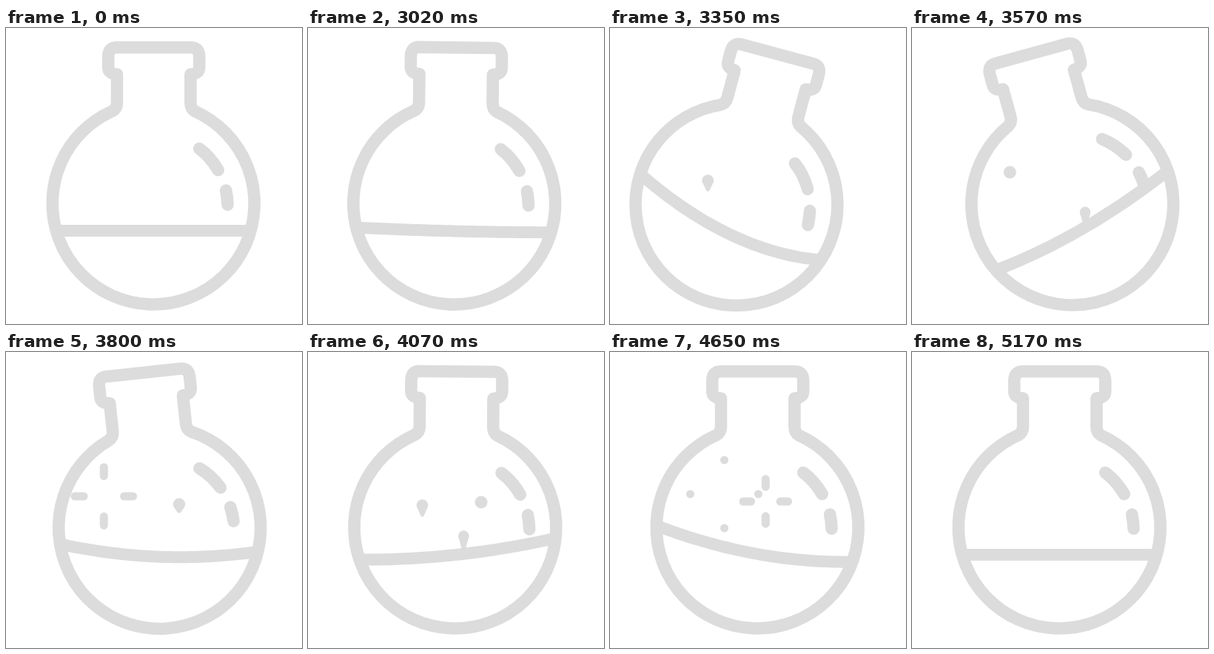
Recreate the animation shown at these times as an HTML page with a canvas. Size 400 px wide and 400 px high, loop 5.22 s.

```html
<!DOCTYPE html>
<html lang="en">
<head>
<meta charset="utf-8">
<title>Flask</title>
<style>
html, body { margin: 0; width: 100%; height: 100%; overflow: hidden; background: #fff; }
canvas { display: block; width: 100vw; height: 100vh; }
</style>
</head>
<body>
<canvas id="stage" width="400" height="400"></canvas>
<script>
const ctx = document.getElementById('stage').getContext('2d');
const LOOP = 5220, STEP = 25, START = 3000;
const COLOR = '#dcdcdc';
const R = 136.5, LINE = 16.6, CX = 199.2, CY = 237;

// Keys: time, then one or more values
const TILT = [[2985, 0], [3305, 17], [3585, -15.5], [3980, 1], [4160, 0]];
const SHIFT = [[2985, 0], [3285, -34], [3585, 17.7], [4010, -0.5], [4160, 0]];
// Liquid surface: height, slope, bend
const SLOSH = [
  [2970, 0, 0, 0], [3340, 7.5, 62, -30], [3580, 4, -76, -16], [3860, 2, 15, -12],
  [4110, 0, -16, -8], [4650, -1, 24.5, -14], [4920, 0, -5, -2], [5150, 0, 0, 0]
];
const DROPS = [
  { x: 132.3, top: 195, start: 3125 },
  { x: 234, top: 203, start: 3510 },
  { x: 154.5, top: 192, start: 3870 },
  { x: 210.3, top: 202, start: 4010 }
];
const RISE = 364, POP = 580, BURST = 200, FADE = 225, REACH = 46;

const mix = (a, b, p) => a + (b - a) * p;

function sample(keys, t) {
  if (t <= keys[0][0]) return keys[0].slice(1);
  for (let i = 1; i < keys.length; i++) {
    const a = keys[i - 1], b = keys[i];
    if (t < b[0]) {
      const p = (1 - Math.cos(Math.PI * (t - a[0]) / (b[0] - a[0]))) / 2;
      return a.slice(1).map((v, k) => mix(v, b[k + 1], p));
    }
  }
  return keys[keys.length - 1].slice(1);
}

function stroke(width, draw) {
  ctx.lineWidth = width;
  ctx.beginPath();
  draw();
  ctx.stroke();
}

// Coordinates relative to the centre of the bulb
function drawFlask(cx, cy, tilt) {
  ctx.save();
  ctx.translate(cx, cy);
  ctx.rotate(tilt * Math.PI / 180);
  const mouth = Math.atan2(-124.5, 56);
  stroke(LINE, () => {
    ctx.arc(0, 0, R, mouth, Math.PI - mouth);
    ctx.quadraticCurveTo(-49.2, -128, -49.2, -136);
    ctx.lineTo(-49.2, -174.5);
    ctx.quadraticCurveTo(-61, -175, -61, -184);
    ctx.lineTo(-61, -198);
    ctx.quadraticCurveTo(-61, -210.7, -50, -210.7);
    ctx.lineTo(51, -210.7);
    ctx.quadraticCurveTo(62, -210.7, 62, -198);
    ctx.lineTo(62, -184);
    ctx.quadraticCurveTo(62, -175, 50.2, -174.5);
    ctx.lineTo(50.2, -136);
    ctx.quadraticCurveTo(50.2, -128, 56, -124.5);
  });
  stroke(LINE, () => {
    ctx.moveTo(62, -74);
    ctx.quadraticCurveTo(77, -63, 87.5, -45);
    ctx.moveTo(98, -17.5);
    ctx.quadraticCurveTo(100, -8, 100.3, 1.8);
  });
  ctx.restore();
}

function drawLiquid(cx, cy, surface) {
  ctx.save();
  ctx.beginPath();
  ctx.arc(cx, cy, R, 0, Math.PI * 2);
  ctx.clip();
  stroke(16, () => {
    for (let dx = -144; dx <= 144; dx += 6) ctx.lineTo(cx + dx, surface(cx + dx));
  });
  ctx.restore();
}

function drawDrop(drop, age, surface) {
  const p = Math.min(1, age / RISE), left = 1 - p;
  const level = surface(drop.x);
  const y = Math.min(level, mix(drop.top, 271, left * left));
  const r = mix(8.5, 7, left);
  const tip = Math.min(y + 8.5 + 16 * left, Math.max(level, y));
  ctx.beginPath();
  ctx.arc(drop.x, y, r, 0, Math.PI * 2);
  ctx.fill();
  if (tip > y + r) {
    ctx.beginPath();
    ctx.moveTo(drop.x - r, y);
    ctx.quadraticCurveTo(drop.x - r * 0.85, y + r * 0.6, drop.x - 1.5, tip);
    ctx.lineTo(drop.x + 1.5, tip);
    ctx.quadraticCurveTo(drop.x + r * 0.85, y + r * 0.6, drop.x + r, y);
    ctx.fill();
  }
}

function drawBurst(drop, age) {
  const p = Math.min(1, age / BURST);
  const head = REACH * (1 - (1 - p) ** 3);
  const tail = Math.min(REACH * p ** 0.7, head - 0.01);
  stroke(11, () => {
    for (const [dx, dy] of [[1, 0], [0, 1], [-1, 0], [0, -1]]) {
      ctx.moveTo(drop.x + dx * tail, drop.top + dy * tail);
      ctx.lineTo(drop.x + dx * head, drop.top + dy * head);
    }
  });
}

function render(now) {
  let t = Math.floor((now % LOOP + 5) / STEP) * STEP;
  if (t <= START) t = 0;
  const [tilt] = sample(TILT, t), [shift] = sample(SHIFT, t);
  const [height, slope, bend] = sample(SLOSH, t);
  const cx = CX + shift, cy = CY + 0.055 * Math.abs(shift);
  const surface = x => {
    const u = (x - cx) / R;
    return cy + 37 + height + slope * u + bend * u * u;
  };

  ctx.fillStyle = '#fff';
  ctx.fillRect(0, 0, 400, 400);
  ctx.fillStyle = ctx.strokeStyle = COLOR;
  ctx.lineCap = ctx.lineJoin = 'round';
  drawLiquid(cx, cy, surface);
  drawFlask(cx, cy, tilt);
  for (const drop of DROPS) {
    const age = t - drop.start;
    if (age < 0) continue;
    if (age < POP) drawDrop(drop, age, surface);
    else if (age < POP + FADE) drawBurst(drop, age - POP);
  }
}

let begin = null;
function tick(now) {
  if (begin === null) begin = now;
  render(Math.max(0, now - begin));
  requestAnimationFrame(tick);
}
render(0);
requestAnimationFrame(tick);
</script>
</body>
</html>
```
